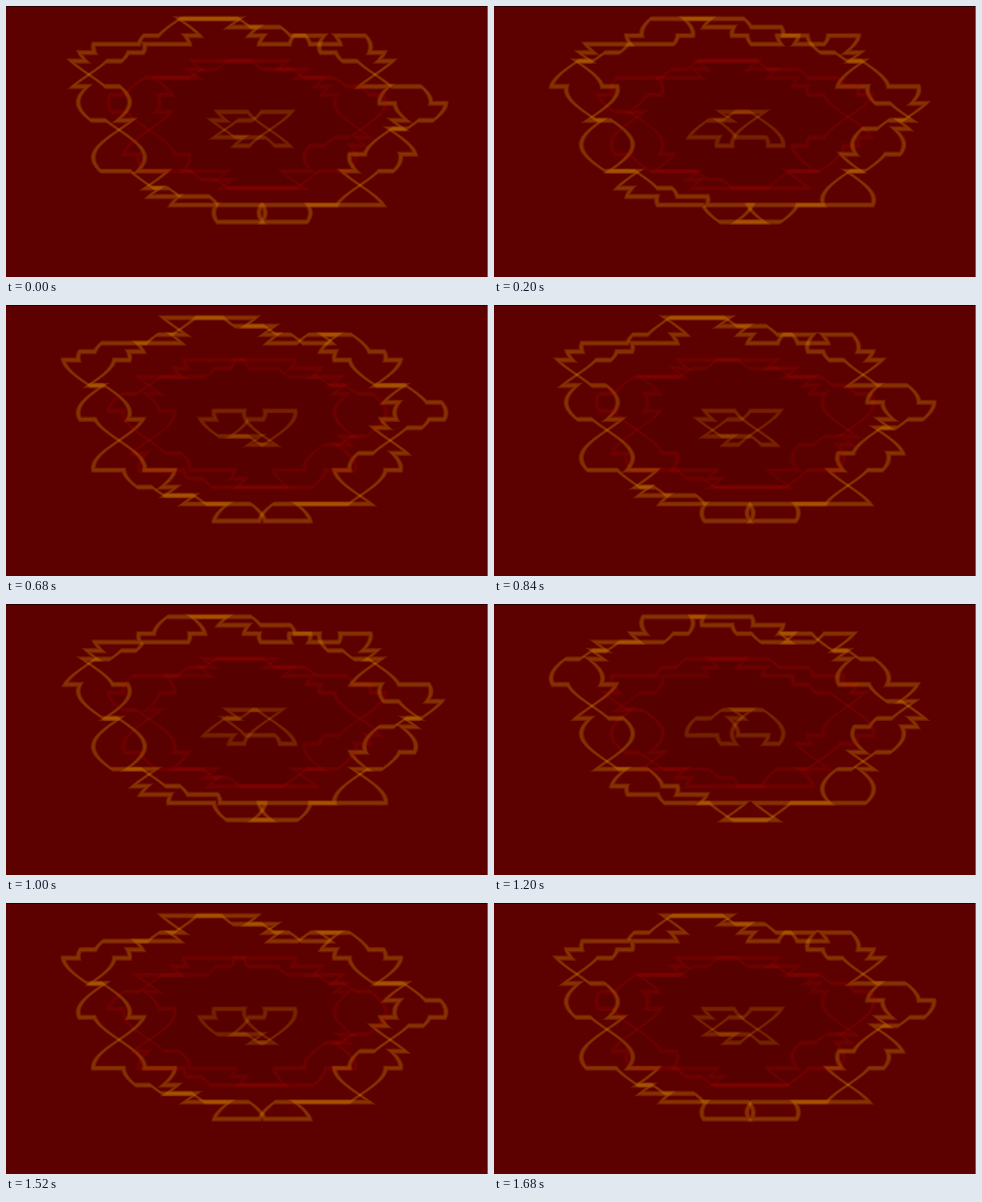
Recreate the animation shown at these times as an HTML page with a canvas. Size 600 px wide and 338 px high, loop 1720 ms.

```html
<!DOCTYPE html>
<html lang="en">
<head>
<meta charset="utf-8">
<title>Rippling contours</title>
<style>
  html, body { margin: 0; height: 100%; overflow: hidden; background: #5c0000; }
  canvas { display: block; width: 600px; height: 338px; }
</style>
</head>
<body>
<canvas id="stage" width="600" height="338"></canvas>
<script>
const W = 600, H = 338, CELLS = 32;
const LOOP = 1720, STEP = 40;
const AMPLITUDE = 32, HALF_WAVE = 69, NODE_Y = 16;

// Stepped contours on a 32 x 32 grid, from the outside in.
const contours = [
  { color: '235,155,0', alpha: 0.3, shade: 0,
    d: 'M11 1H15V2H17V3H18V4H20V3H22V5H23V6H24V9H26V11H27V13H26V14H25V17H24V19H23V23H18V25' +
       'H15V23H12V22H10V21H9V19H7V13H6V9H5V6H6V5H7V4H10V3H11Z' },
  { color: '190,14,0', alpha: 0.17, shade: 0.03,
    d: 'M13 6H17V7H19V8H21V9H22V10H23V15H22V16H21V19H19V21H14V20H13V19H10V17H9V12H8V10H9V8H12V7H13Z' },
  { color: '225,135,0', alpha: 0.24, shade: 0,
    d: 'M15 12H17V16H16V15H14V13H15Z' }
];

const ctx = document.getElementById('stage').getContext('2d');
const layer = document.createElement('canvas');
layer.width = W;
layer.height = H;

function drawContours() {
  const pen = layer.getContext('2d');
  const cellW = W / CELLS, cellH = H / CELLS;
  const grid = new DOMMatrix([cellW, 0, 0, cellH, cellW / 2, cellH / 2]);
  for (const { color, alpha, shade, d } of contours) {
    const path = new Path2D();
    path.addPath(new Path2D(d), grid);
    pen.fillStyle = `rgba(0,0,0,${shade})`;
    pen.fill(path);
    // A wide faint stroke under a narrow one gives a soft edge.
    for (const width of [6.6, 3.8]) {
      pen.lineWidth = width;
      pen.strokeStyle = `rgba(${color},${alpha * 0.55})`;
      pen.stroke(path);
    }
  }
}

function render(time) {
  const phase = 2 * Math.PI * time / LOOP;
  ctx.fillStyle = '#5c0000';
  ctx.fillRect(0, 0, W, H);
  for (let y = 0; y < H; y++) {
    const shift = AMPLITUDE * Math.sin(Math.PI * (y - NODE_Y) / HALF_WAVE + phase);
    for (const dx of [shift, -shift]) ctx.drawImage(layer, 0, y, W, 1, dx, y, W, 1);
  }
  ctx.fillStyle = '#1c0000';
  ctx.fillRect(0, 0, W, 1);
  ctx.fillStyle = 'rgba(255,255,255,0.4)';
  ctx.fillRect(W - 1, 0, 1, H);
}

function tick() {
  const time = performance.now() % LOOP;
  render(Math.floor(time / STEP) * STEP);
  requestAnimationFrame(tick);
}

drawContours();
tick();
</script>
</body>
</html>
```
